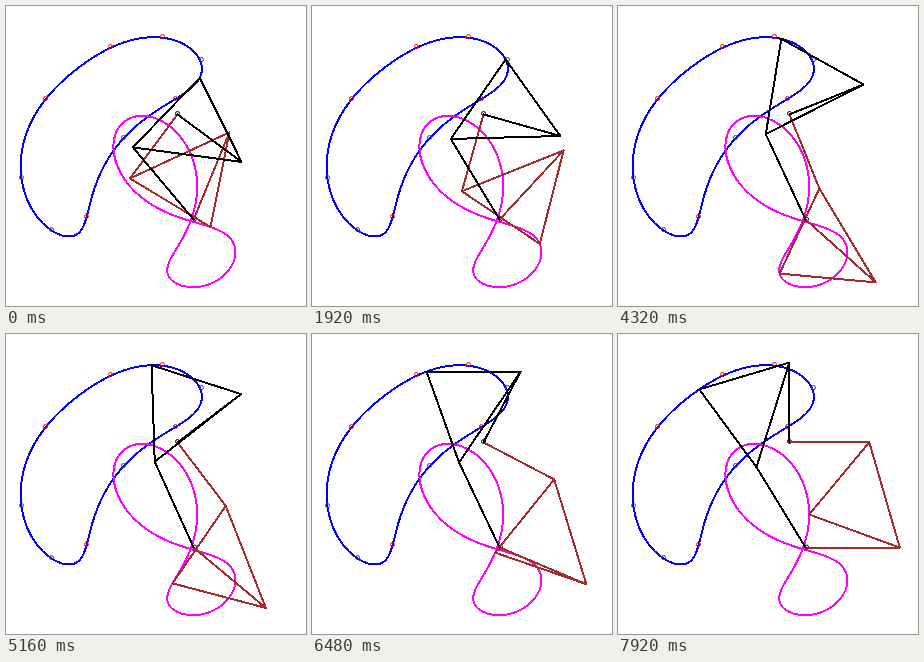
Write an HTML page that moves like this. It is 300 by 300 pixels and loops after 8 s.

```html
<!DOCTYPE html>
<html lang="en">
<head>
<meta charset="utf-8">
<title>Four-bar linkage</title>
<style>
  html, body { margin: 0; width: 100%; height: 100%; overflow: hidden; background: #fff; }
  svg { display: block; width: 100vw; height: 100vh; }
  path { fill: none; stroke-width: 2; stroke-linejoin: round; stroke-linecap: round; shape-rendering: crispEdges; }
  circle { fill: none; stroke-width: 1; }
</style>
</head>
<body>
<svg viewBox="0 0 300 300">
  <path id="upperCurve" stroke="#00f"/>
  <path id="lowerCurve" stroke="#f0f"/>
  <g id="markers"></g>
  <path id="brownLegs" stroke="#a52a2a"/>
  <path id="blackLegs" stroke="#000"/>
</svg>
<script>
  const STEP = 120, LOOP = 8000;
  const crankPivot = [171.5, 108.4], rockerPivot = [187.6, 213.5];
  const CRANK = 79.8, COUPLER = 109.6, ROCKER = 94.2, TIP_NEAR = 94, TIP_FAR = 96.5;
  const RAD = Math.PI / 180;

  const byId = id => document.getElementById(id);
  const polar = ([x, y], r, a) => [x + r * Math.cos(a), y + r * Math.sin(a)];
  // Angle between sides a and b of a triangle, opposite side c
  const corner = (a, b, c) => Math.acos((a * a + b * b - c * c) / (2 * a * b));
  const tipAngle = corner(COUPLER, TIP_NEAR, TIP_FAR);

  // side is +1 or -1: the two ways the linkage can be assembled
  function solve(angle, side) {
    const crank = polar(crankPivot, CRANK, angle);
    const dx = rockerPivot[0] - crank[0], dy = rockerPivot[1] - crank[1];
    const dir = Math.atan2(dy, dx) + side * corner(Math.hypot(dx, dy), COUPLER, ROCKER);
    return {
      crank,
      rocker: polar(crank, COUPLER, dir),
      tip: polar(crank, TIP_NEAR, dir + tipAngle)
    };
  }

  const line = points => 'M' + points.map(p => p.map(v => v.toFixed(2))).join('L');

  function legPath(angle, side) {
    const { crank, rocker, tip } = solve(angle, side);
    return line([crankPivot, crank]) + line([crank, rocker, tip]) + 'Z' + line([rockerPivot, rocker]);
  }

  function tipCurve(side) {
    return line(Array.from({ length: 180 }, (_, i) => solve(i * 2 * RAD, side).tip)) + 'Z';
  }

  function addMarkers(points, color) {
    for (const [x, y] of points) {
      const c = document.createElementNS('http://www.w3.org/2000/svg', 'circle');
      c.setAttribute('cx', x);
      c.setAttribute('cy', y);
      c.setAttribute('r', 2);
      c.setAttribute('stroke', color);
      byId('markers').append(c);
    }
  }

  byId('upperCurve').setAttribute('d', tipCurve(1));
  byId('lowerCurve').setAttribute('d', tipCurve(-1));
  addMarkers([[156.5, 30.5], [104.5, 40.5], [39.5, 92.5], [80.5, 210.5], [169.5, 92.5]], '#f00');
  addMarkers([[195.5, 53.5], [117.5, 131.5], [15.5, 171.5], [45.5, 223.5]], '#3a3a8c');
  addMarkers([[171.5, 107.5], [188.5, 213]], '#000');

  // The crank swings like a pendulum, fastest at step 57
  const crankAngle = n => (-69.3 - 117.1 * Math.sin(1.135 * RAD * (n - 57))) * RAD;

  function draw(now) {
    const angle = crankAngle(Math.floor(now % LOOP / STEP));
    byId('blackLegs').setAttribute('d', legPath(angle, 1));
    byId('brownLegs').setAttribute('d', legPath(angle + Math.PI / 2, -1));
  }

  function tick() {
    draw(performance.now());
    requestAnimationFrame(tick);
  }
  tick();
</script>
</body>
</html>
```
